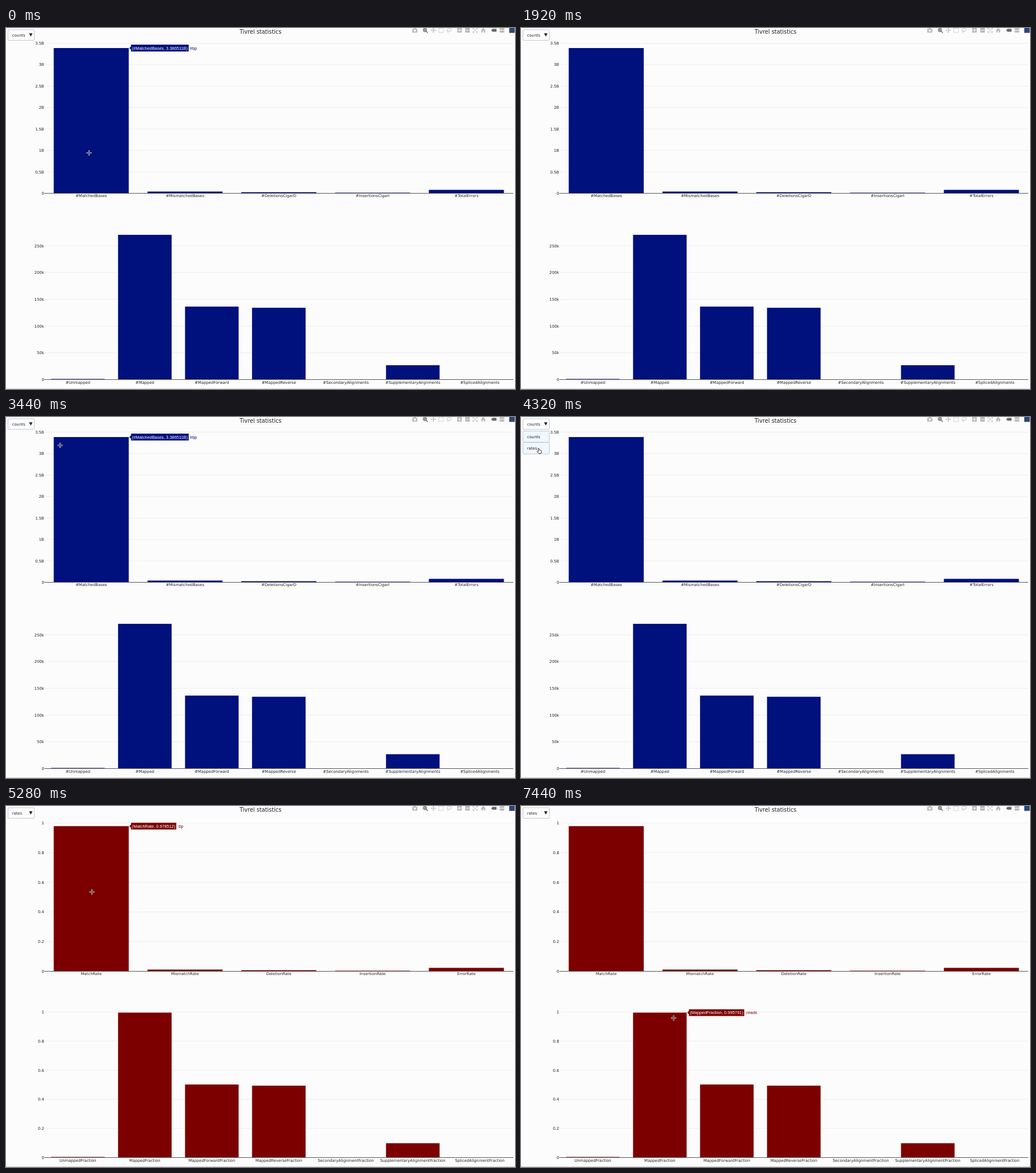
Animation, 889 px wide and 630 px high, one loop 7520 ms. Source, as an HTML page with a canvas:

```html
<!DOCTYPE html>
<html lang="en">
<head>
<meta charset="utf-8">
<title>Alignment statistics</title>
<style>
html, body { margin: 0; width: 100%; height: 100%; overflow: hidden; background: #fcfcfc; }
canvas { display: block; }
</style>
</head>
<body>
<canvas id="stage" width="889" height="630"></canvas>
<script>
const ctx = document.getElementById('stage').getContext('2d');
const LOOP = 7520, STEP = 80;
const MENU_OPEN = 3920, SWITCH = 4560, MENU_CLOSE = 4640;
const LEFT = 67, RIGHT = 886;
const SANS = '"DejaVu Sans", Verdana, sans-serif';
const ARIAL = '"Liberation Sans", Arial, sans-serif';
const UNITS = { B: 1, M: 0.001, k: 1 };

// unit: pixels per 1 (rates), per billion or per thousand (counts)
const VIEWS = {
  counts: {
    color: '#00107d',
    charts: [
      { base: 288.5, labelY: 295, unit: 74.86, tick: 0.5, ticks: 7, suffix: 'B', kind: '#bp',
        names: '#MatchedBases #MismatchedBases #DeletionsCigarD #InsertionsCigarI #TotalErrors',
        values: '3.386511B 40.90412M 25.90626M 13.95893M 80.76931M' },
      { base: 613.5, labelY: 621, unit: 0.934, tick: 50, ticks: 5, suffix: 'k', kind: '#reads',
        names: '#Unmapped #Mapped #MappedForward #MappedReverse #SecondaryAlignments #SupplementaryAlignments #SplicedAlignments',
        values: '1.143k 270.412k 136.297k 134.115k 0 26.804k 0' }
    ]
  },
  rates: {
    color: '#7d0000',
    charts: [
      { base: 288.5, labelY: 295, unit: 258.9, tick: 0.2, ticks: 5, suffix: '', kind: ':bp',
        names: 'MatchRate MismatchRate DeletionRate InsertionRate ErrorRate',
        values: '0.978512 0.011819 0.007485 0.004033 0.023337' },
      { base: 613.5, labelY: 621, unit: 254, tick: 0.2, ticks: 5, suffix: '', kind: ':reads',
        names: 'UnmappedFraction MappedFraction MappedForwardFraction MappedReverseFraction SecondaryAlignmentFraction SupplementaryAlignmentFraction SplicedAlignmentFraction',
        values: '0.004209 0.995791 0.501911 0.493880 0 0.098522 0' }
    ]
  }
};

// Pointer path: time, x, y
const PATH = [
  [0, 145, 218], [400, 235, 400], [720, 350, 515], [1040, 439.5, 525], [1200, 480, 530], [1680, 600, 560],
  [2480, 242, 450], [2880, 150, 210], [3440, 94.5, 49.5], [3760, 38, 14], [3920, 36, 13],
  [4320, 32, 59], [4560, 32, 59], [4880, 110, 90], [5280, 150, 150], [5440, 150, 150],
  [5920, 303, 287], [6000, 303, 287], [6160, 307, 290], [6480, 270, 390], [6800, 235, 410], [6880, 235, 410],
  [7440, 266.5, 370]
];
const HIDDEN = [1680, 2480];

function pointerAt(t) {
  if (t > HIDDEN[0] && t < HIDDEN[1]) return null;
  const i = PATH.findIndex(p => p[0] > t);
  const end = PATH[PATH.length - 1];
  if (i < 0) return { x: end[1], y: end[2] };
  const [t0, x0, y0] = PATH[i - 1], [t1, x1, y1] = PATH[i];
  const u = (t - t0) / (t1 - t0), e = u * u * (3 - 2 * u);
  return { x: x0 + (x1 - x0) * e, y: y0 + (y1 - y0) * e };
}

function text(s, x, y, size = 6.8, align = 'left', color = '#222', font = SANS) {
  ctx.font = `${size}px ${font}`;
  ctx.textAlign = align;
  ctx.fillStyle = color;
  ctx.fillText(s, x, y);
}

function line(x0, y0, x1, y1, color, width = 1) {
  ctx.strokeStyle = color;
  ctx.lineWidth = width;
  ctx.beginPath();
  ctx.moveTo(x0, y0);
  ctx.lineTo(x1, y1);
  ctx.stroke();
}

function rect(x, y, w, h, color) {
  ctx.fillStyle = color;
  ctx.fillRect(x, y, w, h);
}

function shape(d, x, y, fill, stroke, width = 1) {
  const path = new Path2D(d);
  ctx.save();
  ctx.translate(x, y);
  if (fill) { ctx.fillStyle = fill; ctx.fill(path, 'evenodd'); }
  if (stroke) { ctx.strokeStyle = stroke; ctx.lineWidth = width; ctx.stroke(path); }
  ctx.restore();
}

function barsOf(chart) {
  const names = chart.names.split(' '), slot = (RIGHT - LEFT) / names.length;
  return chart.values.split(' ').map((label, i) => {
    const value = parseFloat(label) * (UNITS[label.slice(-1)] || 1);
    const h = value * chart.unit, mid = LEFT + slot * (i + 0.5);
    return { name: names[i], label, mid, x: mid - slot * 0.4, w: slot * 0.8, h, y: chart.base - h };
  });
}

function drawChart(chart, color) {
  for (let i = 0; i <= chart.ticks; i++) {
    const y = chart.base - i * chart.tick * chart.unit;
    if (i) line(LEFT + 1, y, RIGHT, y, '#eeeeee');
    const tick = i ? +(i * chart.tick).toFixed(1) + chart.suffix : '0';
    text(tick, 66.5, y + 2.5, 6.8, 'right');
  }
  for (const b of barsOf(chart)) {
    rect(b.x, b.y, b.w, b.h, color);
    text(b.name, b.mid, chart.labelY, 6.8, 'center');
  }
  line(LEFT, chart.base, RIGHT, chart.base, '#555');
}

function drawHover(chart, color, p) {
  const b = barsOf(chart).find(b =>
    p.x >= b.x && p.x <= b.x + b.w && p.y >= b.y && p.y <= chart.base);
  if (!b) return;
  const label = `(${b.name}, ${b.label})`, size = 7.4;
  ctx.font = `${size}px ${ARIAL}`;
  const x = b.x + b.w + 1, w = ctx.measureText(label).width + 3.4;
  shape(`M0 0L3 -3V-5.9H${3 + w}V5.9H3V3Z`, x, b.y, color);
  text(label, x + 4.6, b.y + 2.6, size, 'left', '#fff', ARIAL);
  text(chart.kind, x + w + 5, b.y + 2.6, size, 'left', color, ARIAL);
}

function button(y, h, label, fill) {
  ctx.beginPath();
  ctx.roundRect(3.5, y, 46, h, 1.5);
  ctx.fillStyle = fill;
  ctx.fill();
  ctx.strokeStyle = '#bec8d9';
  ctx.lineWidth = 1;
  ctx.stroke();
  text(label, 10.7, y + h / 2 + 2.3);
}

function drawMenu(view, open) {
  button(3, 18.5, view, '#fdfdfd');
  shape('M-3 -2.7H3L0 2.9Z', 43.3, 12, '#222');
  if (!open) return;
  button(24.5, 19.5, 'counts', '#f0f7fe');
  button(44.5, 20, 'rates', '#f0f7fe');
}

function drawToolbar() {
  const gray = '#b9b9b9', dark = '#686868';
  shape('M-4.5 -2.5H-2.3L-1.3 -4H1.3L2.3 -2.5H4.5V4H-4.5ZM2 .6A2 2 0 1 0 -2 .6A2 2 0 1 0 2 .6', 714, 4, gray);
  shape('M2 -.5A2.8 2.8 0 1 0 -3.6 -.5A2.8 2.8 0 1 0 2 -.5M1.2 1.5L4.2 4.5M-2.2 -.5H.6M-.8 -1.9V.9', 732.5, 4, null, dark, 1.3);
  shape('M-4 0H4M0 -4V4M-2.8 -1.3L-4 0L-2.8 1.3M2.8 -1.3L4 0L2.8 1.3M-1.3 -2.8L0 -4L1.3 -2.8M-1.3 2.8L0 4L1.3 2.8', 746.5, 4, null, gray);
  ctx.setLineDash([1.5, 1]);
  shape('M-4 -3.5H4V4H-4Z', 760, 4, null, gray);
  ctx.setLineDash([]);
  shape('M-2.5 2C-6 -1 -2 -4 1 -3.8C5 -3.5 5 1 1 1.5C-1 2 -3 .5 -2.8 2.5Q-2.5 4 -1 4', 774, 4, null, gray);
  shape('M-4 -4H4V4H-4ZM-2.5 -.6V.6H-.6V2.5H.6V.6H2.5V-.6H.6V-2.5H-.6V-.6Z', 792, 4, gray);
  shape('M-4 -4H4V4H-4ZM-2.5 -.6V.6H2.5V-.6Z', 806, 4, gray);
  shape('M-4 -1.5V-4H-1.5M1.5 -4H4V-1.5M4 1.5V4H1.5M-1.5 4H-4V1.5M-3 -3L3 3M3 -3L-3 3', 819.5, 4, null, gray, 0.9);
  shape('M-4.5 .5L0 -4L4.5 .5H3.3V4H1V1.2H-1V4H-3.3V.5Z', 833.5, 4, gray);
  shape('M-4.8 0L-2.2 -2.6H4.7V2.6H-2.2Z', 852, 4, dark);
  shape('M-4.6 -2L-3 -3.8H4.4V-.5H-3ZM-4.6 2.3L-3 .5H4.4V4H-3Z', 866, 4, gray);
  rect(879, 0, 9.5, 8.5, '#2f4577');
}

function drawPointer({ x, y }, open) {
  const inPlot = x > LEFT && (y > 26 && y < 286 || y > 350 && y < 613);
  if (x < 50 && y < (open ? 65 : 22)) {
    shape('M-2.2 -4.2Q-1.4 -5 -.7 -4.1L.1 -1.6L2.6 -1Q4 -.5 3.8 1L3.1 4.5H-1.1L-3.6 1.2Q-3.8 .1 -2.5 .3L-1.5 1Z', x, y, '#fff', '#222', 0.9);
  } else if (x > LEFT && y > 286 && y < 298) {
    shape('M-5 0L-2.4 -2.3V-.7H2.4V-2.3L5 0L2.4 2.3V.7H-2.4V2.3Z', x, y, '#111', '#fff', 0.3);
  } else if (inPlot) {
    shape('M-4.5 0H4.5M0 -4.5V4.5', x, y, null, '#d8d8d8', 2.2);
    shape('M-3.9 0H3.9M0 -3.9V3.9', x, y, null, '#333', 0.9);
  } else {
    shape('M0 0V8L2 6.2L3.3 9L4.5 8.5L3.3 5.8H5.8Z', x, y, '#111', '#fff', 0.6);
  }
}

function draw(now) {
  const t = Math.floor(now % LOOP / STEP) * STEP;
  const name = t < SWITCH ? 'counts' : 'rates', view = VIEWS[name];
  const open = t >= MENU_OPEN && t < MENU_CLOSE;
  const p = pointerAt(t);

  rect(0, 0, 889, 630, '#fcfcfc');
  view.charts.forEach(c => drawChart(c, view.color));
  line(0, 629.5, 889, 629.5, '#cfcfcf');
  text('Tivrel statistics', 444.5, 9.7, 9.75, 'center');
  drawToolbar();
  drawMenu(name, open);
  if (p) {
    view.charts.forEach(c => drawHover(c, view.color, p));
    drawPointer(p, open);
  }
}

const start = performance.now();
function tick() {
  draw(performance.now() - start);
  requestAnimationFrame(tick);
}
tick();
</script>
</body>
</html>
```
